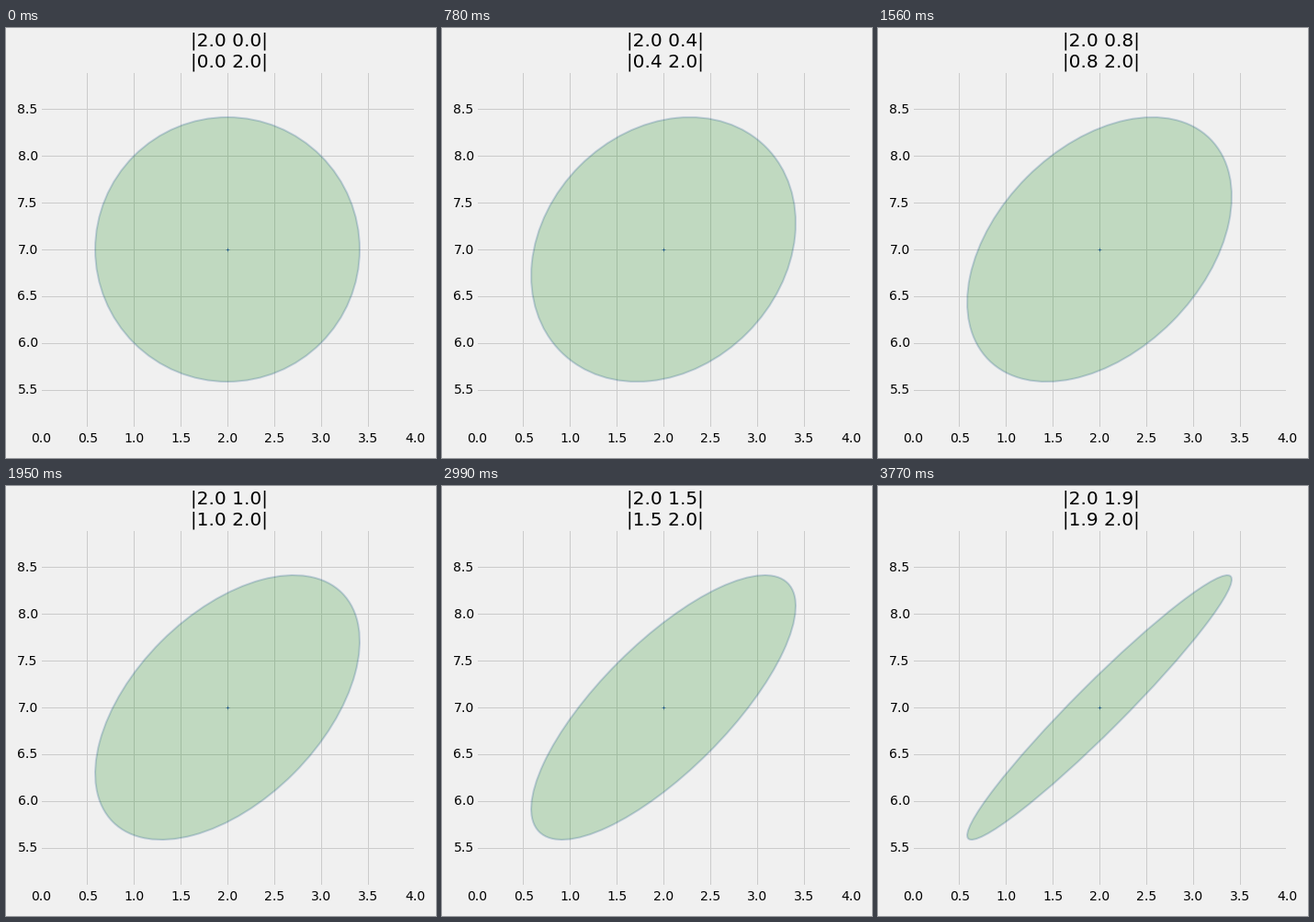
Animation of 468x468 px, one loop 3900 ms. Source, as a matplotlib script:

```python
import numpy as np
import matplotlib.pyplot as plt
from matplotlib.animation import FuncAnimation
from matplotlib.patches import Ellipse
from matplotlib.ticker import FormatStrFormatter, MultipleLocator
from matplotlib.transforms import ScaledTranslation

SIZE, DPI = 468, 72
FRAMES, INTERVAL = 30, 130
VAR = 2.0
CENTER = (2, 7)
BG, GRID, EDGE = "#f0f0f0", "#cbcbcb", "#004080"

plt.rcParams["font.family"] = "DejaVu Sans"

fig = plt.figure(figsize=(SIZE / DPI, SIZE / DPI), dpi=DPI, facecolor=BG)
ax = fig.add_axes([0.08, 0.07, 0.87, 0.83], facecolor=BG)

# Equal scale on both axes, centred on the mean
half_h = 2 * 0.83 / 0.87
ax.set_xlim(0, 4)
ax.set_ylim(CENTER[1] - half_h, CENTER[1] + half_h)

for axis in (ax.xaxis, ax.yaxis):
    axis.set_major_locator(MultipleLocator(0.5))
    axis.set_major_formatter(FormatStrFormatter("%.1f"))
ax.set_axisbelow(True)
ax.grid(color=GRID, lw=1, ls="-")
ax.tick_params(length=0, labelsize=14, labelcolor="black")
ax.tick_params(axis="x", pad=5.7)
ax.tick_params(axis="y", pad=3.7)
for spine in ax.spines.values():
    spine.set(color=BG, linewidth=3)

ellipse = ax.add_patch(Ellipse(CENTER, 1, 1, angle=45, facecolor="green",
                               edgecolor=EDGE, alpha=0.2, lw=2))
ax.scatter(*CENTER, s=20, marker="+", color=EDGE, linewidths=0.5)
title = ax.set_title("", fontsize=20.16, pad=3.8, color="black")


def nudge(texts, dx, dy):
    """Shift texts by a distance in pixels."""
    shift = ScaledTranslation(dx / DPI, dy / DPI, fig.dpi_scale_trans)
    for text in texts:
        text.set_transform(text.get_transform() + shift)


nudge(ax.get_xticklabels(), 0.5, 1)
nudge(ax.get_yticklabels(), 1, 1)
nudge([title], 2, 1)


def update(i):
    cov = VAR * i / FRAMES
    ellipse.set_width(2 * np.sqrt(VAR + cov))
    ellipse.set_height(2 * np.sqrt(VAR - cov))
    title.set_text(f"|{VAR:.1f} {cov:.1f}|\n|{cov:.1f} {VAR:.1f}|")
    return ellipse, title


anim = FuncAnimation(fig, update, frames=FRAMES, interval=INTERVAL,
                     repeat=True, repeat_delay=0)
plt.show()
```
